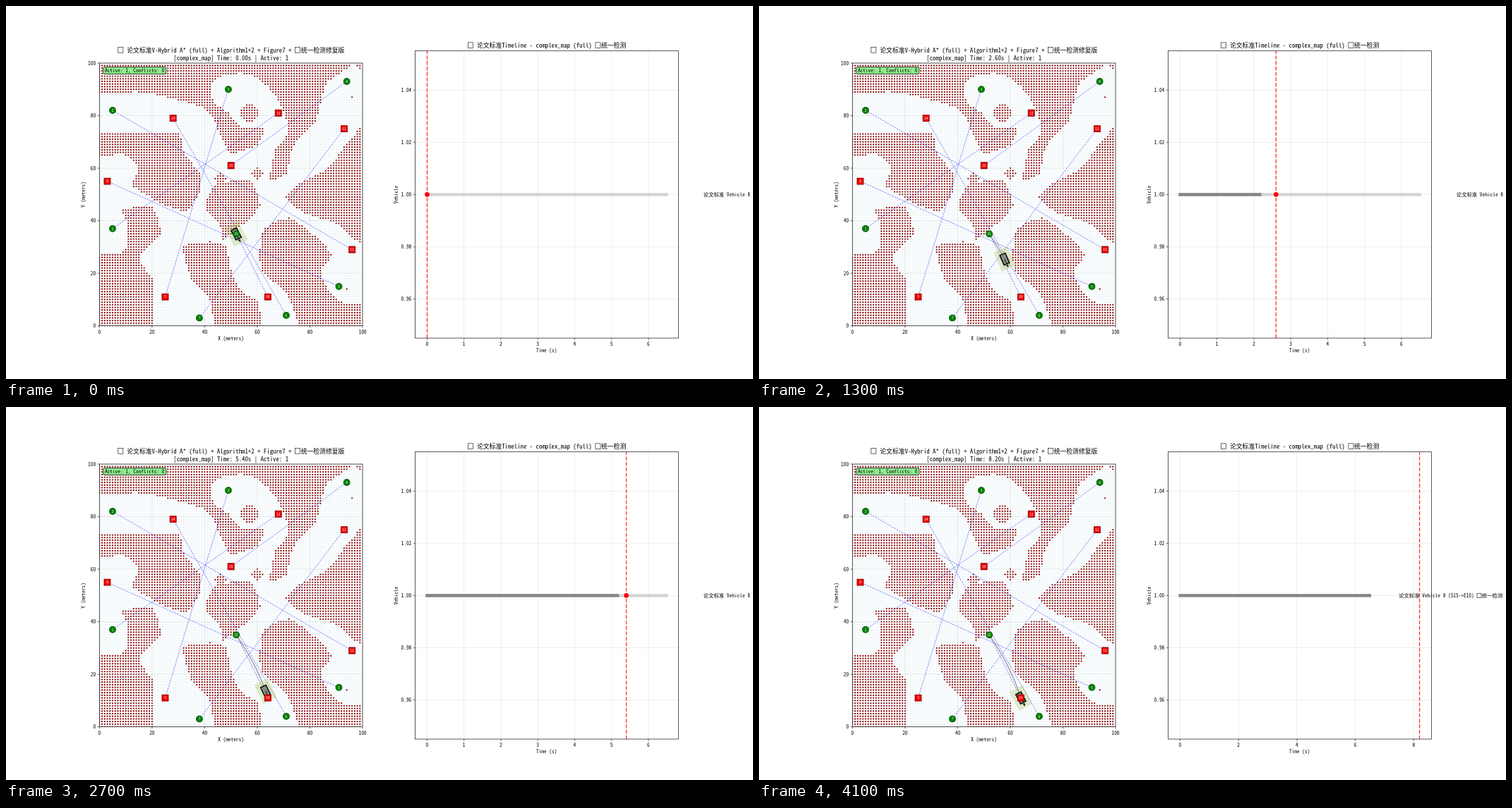
An HTML page with a canvas for the animation above (4200 ms loop, 1058 px wide and 529 px high).

```html
<!DOCTYPE html>
<html lang="zh">
<head>
<meta charset="utf-8">
<title>Vehicle timeline</title>
<style>
html, body { margin: 0; width: 100%; height: 100%; overflow: hidden; background: #fff; }
canvas { display: block; }
</style>
</head>
<body>
<canvas id="stage" width="1058" height="529"></canvas>
<script>
const W = 1058, H = 529;
const LOOP = 4200, STEP = 100, DT = 0.2;
const END = 6.49;
const UNIT = 3.727;
const MAP = { l: 132.3, r: 505, t: 81, b: 453.6 };
const LINE = { l: 579.5, r: 952.5, t: 63.7, b: 471 };
const MID = 267.4;
const CJK = '"Noto Sans Mono CJK SC", "Noto Sans CJK SC", "Noto Sans CJK", sans-serif';
const MONO = '"Noto Sans Mono CJK SC", "Liberation Mono", monospace';
const GRID = 'rgba(176,176,176,0.32)';

const stage = document.getElementById('stage').getContext('2d');
let ctx = stage;

const mx = x => MAP.l + x * UNIT;
const my = y => MAP.b - y * UNIT;

// Obstacles in metres: key points of smooth outlines, and round spots [x, y, radius]
const OUTLINES = {
  top: [[-2,102], [92,102], [86,92], [82,78], [74,69], [71,58], [65,56], [67,67], [72,74], [69,84], [63,92],
        [55,96], [44,94], [43,86], [49,81], [54,75.5], [62,75], [60,69], [50,66], [45,75], [41,82], [30,86],
        [15,89], [-2,89]],
  left: [[-2,73], [15,73], [30,73], [32,66], [38,58], [38,51], [33,44], [25,46], [13,53], [15,60], [10,65], [-2,65]],
  lowerLeft: [[9,44], [20,45], [23,35], [15,26], [20,18], [20,9], [19,-2], [-2,-2], [-2,25], [9,28], [11,38]],
  centre: [[45,54], [57,55], [61,46], [55,39], [47,33], [46,38], [41,44], [41,48]],
  lowerCentre: [[32,30], [42,32], [48,30], [50,21], [54,13], [60,9], [61,-2], [45,-2], [42,10], [35,18]],
  right: [[102,75], [93,68], [87,60], [76,54], [71,49], [78,43], [90,39], [102,32]],
  lowerRight: [[63,37], [72,41], [82,34], [88,27], [84,20], [89,11], [96,8], [102,9], [102,-2], [78,-2], [72,11],
               [62,21], [61,29]]
};
const SPOTS = [[57,81,3.3], [46,56,2.1], [60,58,2], [100,100,2.5], [96,87,0.8], [94,14,0.5]];

// Each route: number and place of its start, then of its goal
const ROUTES = [
  [1, 5, 37, 13, 68, 81], [2, 5, 82, 11, 96, 29], [3, 49, 90, 9, 25, 11], [4, 94, 93, 16, 50, 61],
  [5, 91, 15, 8, 3, 55], [6, 71, 4, 14, 28, 79], [7, 38, 3, 12, 93, 75], [15, 52, 35, 10, 64, 11]
];

// A gentle bow from start to goal, slow at both ends
function pose(time) {
  const s = Math.min(time / END, 1);
  const bump = Math.sin(Math.PI * s);
  const u = s - 0.05 * Math.sin(2 * Math.PI * s) + 0.03 * bump;
  const v = 1 - u;
  return {
    x: mx(v * v * 52 + 2 * u * v * 60.2 + u * u * 64),
    y: my(35 - 24 * u),
    angle: (62.5 + 4 * bump) * Math.PI / 180
  };
}

// End of the last finished planning step
function finished(t) {
  return t >= END ? END : Math.max(0, 0.16 + 0.5 * Math.floor((t - 0.16) / 0.5));
}

function smoothOutline(points) {
  const path = new Path2D(), n = points.length;
  const at = i => points[(i + n) % n];
  path.moveTo(...at(0));
  for (let i = 0; i < n; i++) {
    const [a, b, c, d] = [at(i - 1), at(i), at(i + 1), at(i + 2)];
    path.bezierCurveTo(b[0] + (c[0] - a[0]) / 8, b[1] + (c[1] - a[1]) / 8,
      c[0] - (d[0] - b[0]) / 8, c[1] - (d[1] - b[1]) / 8, c[0], c[1]);
  }
  return path;
}

// Latin letters take half an em, wide ones a full em; □ is drawn as a box
function latinFont(size) {
  ctx.font = `100px ${MONO}`;
  return `${size * 50 / ctx.measureText('0').width}px ${MONO}`;
}

function text(s, x, y, size, align = 'center', color = '#000') {
  const runs = s.match(/□|[\u4e00-\u9fff]+|[^□\u4e00-\u9fff]+/g);
  const wide = r => r === '□' || r >= '\u4e00';
  const width = r => r.length * size * (wide(r) ? 1 : 0.5);
  const total = runs.reduce((sum, r) => sum + width(r), 0);
  const latin = latinFont(size);
  let cx = x - total * ({ left: 0, center: 0.5, right: 1 })[align];
  ctx.fillStyle = color;
  ctx.textAlign = 'left';
  for (const r of runs) {
    if (r === '□') {
      ctx.strokeStyle = color;
      ctx.lineWidth = 0.6;
      ctx.strokeRect(cx + size * 0.08, y - size * 0.43, size * 0.8, size * 0.86);
    } else {
      ctx.font = wide(r) ? `${size}px ${CJK}` : latin;
      ctx.fillText(r, cx, y + size * 0.36);
    }
    cx += width(r);
  }
}

function upright(s, x, y, size) {
  ctx.save();
  ctx.translate(x, y);
  ctx.rotate(-Math.PI / 2);
  text(s, 0, 0, size);
  ctx.restore();
}

function line(x1, y1, x2, y2, color, width, dash = []) {
  ctx.strokeStyle = color;
  ctx.lineWidth = width;
  ctx.setLineDash(dash);
  ctx.beginPath();
  ctx.moveTo(x1, y1);
  ctx.lineTo(x2, y2);
  ctx.stroke();
  ctx.setLineDash([]);
}

function dot(x, y, r, color) {
  ctx.fillStyle = color;
  ctx.beginPath();
  ctx.arc(x, y, r, 0, 2 * Math.PI);
  ctx.fill();
}

function frame(b) {
  ctx.strokeStyle = '#000';
  ctx.lineWidth = 0.65;
  ctx.strokeRect(b.l, b.t, b.r - b.l, b.b - b.t);
}

function xTick(box, x, label) {
  line(x, box.t, x, box.b, GRID, 0.7);
  line(x, box.b, x, box.b + 2.6, '#000', 0.6);
  text(label, x, box.b + 8.6, 7.35);
}

function yTick(box, y, label) {
  line(box.l, y, box.r, y, GRID, 0.7);
  line(box.l - 2.6, y, box.l, y, '#000', 0.6);
  text(label, box.l - 5.2, y, 7.35, 'right');
}

function drawCells() {
  const paths = Object.values(OUTLINES).map(smoothOutline);
  const solid = (i, j) => paths.some(p => ctx.isPointInPath(p, i, j))
    || SPOTS.some(([x, y, r]) => Math.hypot(i - x, j - y) <= r);
  for (let i = 0; i < 100; i++) {
    for (let j = 0; j < 100; j++) {
      if (solid(i, j)) dot(mx(i), my(j), 1.12, '#8b0000');
      else dot(mx(i), my(j), 0.75, 'rgba(173,210,225,0.35)');
    }
  }
}

function drawMap() {
  ctx.fillStyle = '#fff';
  ctx.fillRect(0, 0, W, H);
  ctx.fillStyle = '#fafcfd';
  ctx.fillRect(MAP.l, MAP.t, MAP.r - MAP.l, MAP.b - MAP.t);
  ctx.save();
  ctx.beginPath();
  ctx.rect(MAP.l, MAP.t, MAP.r - MAP.l, MAP.b - MAP.t);
  ctx.clip();
  drawCells();
  ctx.restore();
  for (let v = 0; v <= 100; v += 20) {
    xTick(MAP, mx(v), String(v));
    yTick(MAP, my(v), String(v));
  }
  for (const [, x1, y1, , x2, y2] of ROUTES) {
    line(mx(x1), my(y1), mx(x2), my(y2), 'rgba(0,0,255,0.6)', 0.75, [2.7, 1.2]);
  }
  frame(MAP);
  text('X (meters)', 318.5, 471.5, 7.35);
  upright('Y (meters)', 109.5, MID, 7.35);
  text('□ 论文标准V-Hybrid A* (full) + Algorithm1+2 + Figure7 + □统一检测修复版', 318.7, 62.4, 8.8);
}

function marker(n, x, y, round, fill, edge) {
  ctx.beginPath();
  if (round) ctx.arc(x, y, 4.4, 0, 2 * Math.PI);
  else ctx.rect(x - 4.4, y - 4.4, 8.8, 8.8);
  ctx.fillStyle = fill;
  ctx.fill();
  ctx.strokeStyle = edge;
  ctx.lineWidth = 1.1;
  ctx.stroke();
  text(String(n), x, y, 5.2, 'center', '#fff');
}

function drawMarkers() {
  for (const [n, x1, y1, m, x2, y2] of ROUTES) {
    marker(n, mx(x1), my(y1), true, '#008000', '#006400');
    marker(m, mx(x2), my(y2), false, '#f00', '#8b0000');
  }
}

function drawBadge() {
  ctx.beginPath();
  ctx.roundRect(137.8, 86.6, 89, 9.8, 1.6);
  ctx.fillStyle = '#90ee90';
  ctx.fill();
  ctx.strokeStyle = '#000';
  ctx.lineWidth = 0.75;
  ctx.stroke();
  text('Active: 1, Conflicts: 0', 139.9, 91.3, 7.35, 'left');
}

function drawVehicle(t) {
  ctx.strokeStyle = 'rgba(127,127,127,0.75)';
  ctx.lineWidth = 1.4;
  ctx.beginPath();
  for (let s = 0; s <= Math.min(t, END) + 1e-6; s += 0.1) {
    const p = pose(s);
    ctx.lineTo(p.x, p.y);
  }
  ctx.stroke();

  const p = pose(t);
  ctx.save();
  ctx.translate(p.x, p.y);
  ctx.rotate(p.angle);
  ctx.fillStyle = 'rgba(154,190,60,0.28)';
  ctx.fillRect(-15, -10.7, 30, 21.4);
  ctx.fillStyle = 'rgba(127,127,127,0.85)';
  ctx.fillRect(-7.5, -4.2, 15, 8.4);
  ctx.strokeStyle = '#000';
  ctx.lineWidth = 1.4;
  ctx.strokeRect(-7.5, -4.2, 15, 8.4);
  line(0, 0, 10.5, 0, '#222', 1.1);
  ctx.fillStyle = '#222';
  ctx.beginPath();
  ctx.moveTo(13, 0);
  ctx.lineTo(9.5, -2);
  ctx.lineTo(9.5, 2);
  ctx.fill();
  ctx.restore();
}

function drawTimeline(t) {
  const span = Math.max(t, END) * 1.1;
  const scale = (LINE.r - LINE.l) / span;
  const tx = s => LINE.l + (s + span / 22) * scale;
  const step = span > 9 ? 2 : 1;
  for (let s = 0; s <= span * 21 / 22; s += step) xTick(LINE, tx(s), String(s));
  for (let k = -2; k <= 2; k++) yTick(LINE, MID - k * 74.05, (1 + k * 0.02).toFixed(2));

  const bar = (end, color) => {
    ctx.fillStyle = color;
    ctx.fillRect(tx(0) - 2.2, MID - 2.2, tx(end) - tx(0) + 4.4, 4.4);
  };
  const done = finished(t);
  if (t < END) bar(END, '#d4d4d4');
  if (done > 0) bar(done, '#868686');

  line(tx(t), LINE.b, tx(t), LINE.t, 'rgba(255,0,0,0.8)', 1.3, [5.4, 2.35]);
  if (t < END) dot(tx(t), MID, 3.3, '#f00');
  frame(LINE);
  text('论文标准 Vehicle 8 (S15->E10) □统一检测', tx(END + 1), MID, 7.35, 'left');
  text('Time (s)', 765.7, 488.3, 7.35);
  upright('Vehicle', 552.8, MID, 7.35);
  text('□ 论文标准Timeline - complex_map (full) □统一检测', 766, 55.6, 8.8);
}

const base = document.createElement('canvas');
base.width = W;
base.height = H;
ctx = base.getContext('2d');
drawMap();
ctx = stage;

function render(ms) {
  const t = Math.floor((ms % LOOP) / STEP) * DT;
  ctx.drawImage(base, 0, 0);
  drawVehicle(t);
  drawMarkers();
  drawBadge();
  text(`[complex_map] Time: ${t.toFixed(2)}s | Active: 1`, 318.7, 73.4, 8.8);
  drawTimeline(t);
}

const began = performance.now();
function tick() {
  render(performance.now() - began);
  requestAnimationFrame(tick);
}
tick();
</script>
</body>
</html>
```
